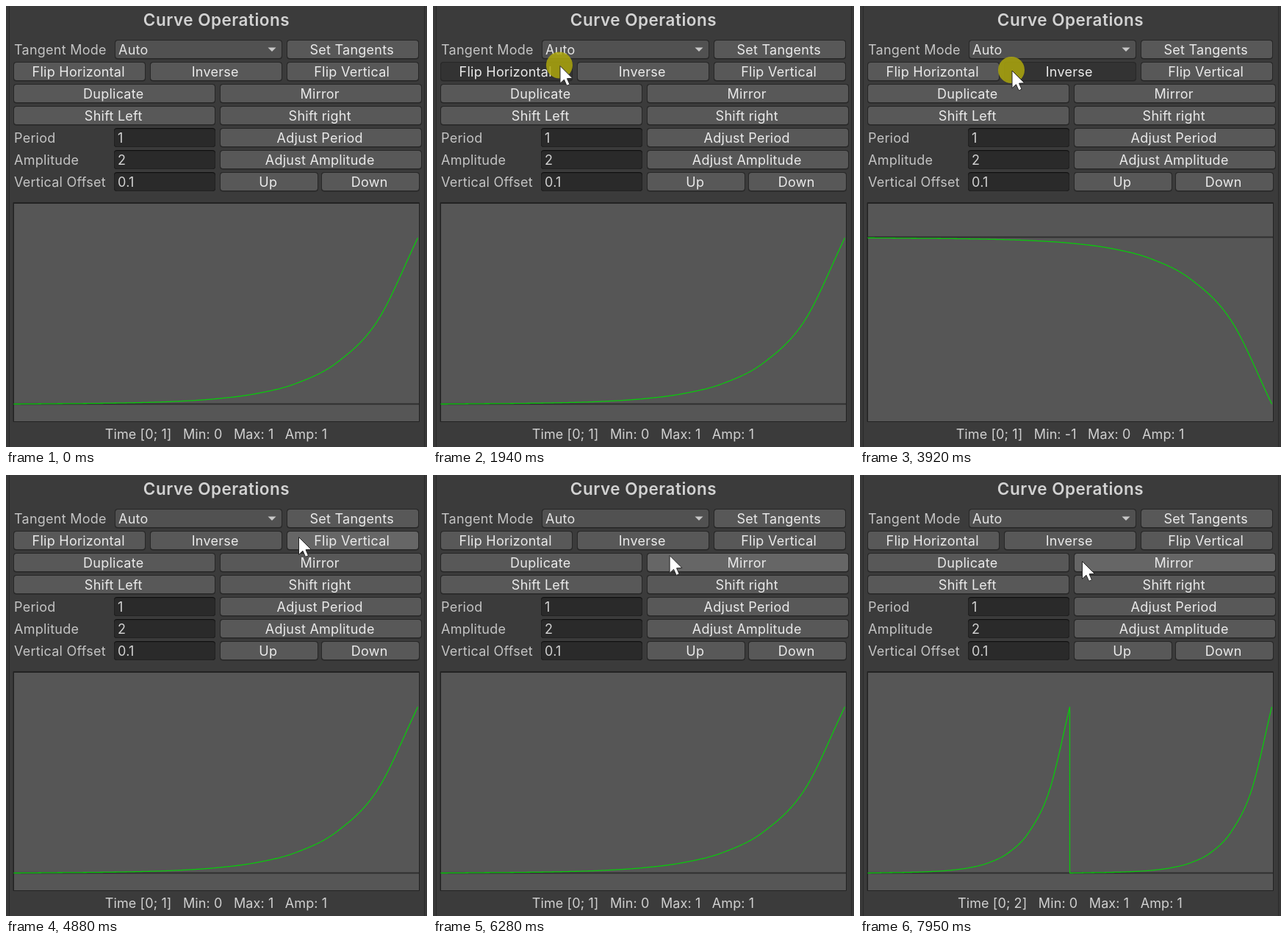
Animation of 573 by 600 pixels, one loop 8 s. Source, as an HTML page with a canvas:

```html
<!DOCTYPE html>
<html lang="en">
<head>
<meta charset="utf-8">
<title>Curve Operations</title>
<style>
html, body { margin: 0; width: 100%; height: 100%; overflow: hidden; background: #383838; }
canvas { display: block; width: 573px; height: 600px; }
</style>
</head>
<body>
<canvas id="stage"></canvas>
<script>
const W = 573, H = 600, LOOP = 8000;
const canvas = document.getElementById('stage');
const ctx = canvas.getContext('2d');
const dpr = window.devicePixelRatio || 1;
canvas.width = W * dpr;
canvas.height = H * dpr;

const ROW_TOP = 46, ROW_STEP = 30, ROW_H = 26.5, FIELD_H = 26;
const FONT = 'Inter, "Open Sans", sans-serif';
const BODY = { font: '18px', tracking: 0.25 };
const TITLE = { font: '600 22.5px', tracking: 0.5 };
const STATUS = { font: '18px', tracking: 0.1 };

// [label, row, left, right]
const buttons = [
  ['Set Tangents', 0, 382, 562],
  ['Flip Horizontal', 1, 10, 190], ['Inverse', 1, 196, 376], ['Flip Vertical', 1, 382, 562],
  ['Duplicate', 2, 10, 285], ['Mirror', 2, 291, 566],
  ['Shift Left', 3, 10, 285], ['Shift right', 3, 291, 566],
  ['Adjust Period', 4, 291, 566],
  ['Adjust Amplitude', 5, 291, 566],
  ['Up', 6, 291, 425], ['Down', 6, 429, 563]
];
const fields = [['Period', 4, '1'], ['Amplitude', 5, '2'], ['Vertical Offset', 6, '0.1']];

// [press, release, curve shown afterwards]
const clicks = [
  [1940, 2010, 'flipX'], [2350, 2420, 'plain'],
  [3450, 3520, 'inverse'], [3920, 3990, 'plain'],
  [5010, 5140, 'flipY'], [5740, 5870, 'plain'],
  [7020, 7090, 'double']
];

// Stepped pointer moves along quadratic paths
const smooth = u => u * u * (3 - 2 * u);
const easeOut = u => 1 - (1 - u) ** 2;
const linear = u => u;
const moves = [
  { t0: 720, t1: 1470, n: 12, from: [531, 351], via: [310, 135], to: [174, 82], ease: smooth, fresh: true },
  { t0: 1540, t1: 1540, n: 1, from: [174, 82], via: [173, 81], to: [172.5, 81], ease: linear },
  { t0: 2540, t1: 2750, n: 4, from: [172.5, 81], via: [200, 87], to: [205.5, 87], ease: smooth },
  { t0: 2980, t1: 2980, n: 1, from: [205.5, 87], via: [206, 87], to: [206.5, 87.5], ease: linear },
  { t0: 4190, t1: 4880, n: 11, from: [206.5, 87.5], via: [305, 99], to: [398, 84], ease: smooth },
  { t0: 6140, t1: 6760, n: 10, from: [398, 84], via: [318, 117], to: [258, 117], ease: easeOut },
  { t0: 7690, t1: 7950, n: 5, from: [258, 117], via: [280, 117], to: [302, 117], ease: smooth }
];

function pointer(t) {
  const m = moves.filter(m => t >= m.t0).pop();
  if (!m) return null;
  const gap = m.n > 1 ? (m.t1 - m.t0) / (m.n - 1) : 1;
  const step = Math.min(m.n - 1, Math.floor((t - m.t0) / gap + 1e-6));
  const u = m.ease(m.fresh ? step / (m.n - 1) : (step + 1) / m.n);
  return m.from.map((a, i) => (1 - u) ** 2 * a + 2 * u * (1 - u) * m.via[i] + u * u * m.to[i]);
}

// Exponential ease sampled at tenths, joined with auto tangents
const key = i => i <= 0 ? 0 : 2 ** (Math.min(i, 10) - 10);
const slope = i => i <= 0 ? 0 : i >= 10 ? key(10) - key(9) : (key(i + 1) - key(i - 1)) / 2;
function expo(t) {
  const i = Math.min(9, Math.floor(t * 10)), s = t * 10 - i;
  const s2 = s * s, s3 = s2 * s;
  return (2 * s3 - 3 * s2 + 1) * key(i) + (s3 - 2 * s2 + s) * slope(i) +
         (3 * s2 - 2 * s3) * key(i + 1) + (s3 - s2) * slope(i + 1);
}

const curves = {
  plain: expo,
  flipX: u => expo(1 - u),
  flipY: u => 1 - expo(u),
  inverse: u => 1 - expo(u),
  double: u => u <= 0.5 ? expo(u * 2) : expo(u * 2 - 1)
};

function rect(x, y, w, h, color, r = 0) {
  ctx.fillStyle = color;
  ctx.beginPath();
  ctx.roundRect(x, y, w, h, r);
  ctx.fill();
}

function text(str, x, y, color, align = 'left', style = BODY) {
  ctx.font = `${style.font} ${FONT}`;
  ctx.letterSpacing = `${style.tracking}px`;
  ctx.textAlign = align;
  ctx.fillStyle = color;
  ctx.fillText(str, x, y);
}

const rowY = row => ROW_TOP + row * ROW_STEP;
const baseY = row => rowY(row) + 19.5;

function box(row, x0, x1, face) {
  const y = rowY(row);
  rect(x0, y, x1 - x0, ROW_H, '#272727', 4);
  rect(x0 + 1, y + 1, x1 - x0 - 2, ROW_H - 2.5, face, 3.5);
}

function field(row, x0, x1) {
  const y = rowY(row), w = x1 - x0;
  rect(x0, y, w, FIELD_H, '#0f0f0f', 4);
  rect(x0, y + 1, w, FIELD_H - 1, '#212121', 4);
  rect(x0 + 1, y + 1.5, w - 2, FIELD_H - 2.5, '#2a2a2a', 3);
}

function drawControls(pos, pressed) {
  text('Curve Operations', 286.5, 27, '#d2d2d2', 'center', TITLE);
  text('Tangent Mode', 11, baseY(0), '#c4c4c4');
  box(0, 148, 376, '#515151');
  text('Auto', 153, baseY(0), '#e4e4e4');
  ctx.fillStyle = '#c8c8c8';
  ctx.beginPath();
  ctx.moveTo(356.5, 56.5);
  ctx.lineTo(367.5, 56.5);
  ctx.lineTo(362, 62);
  ctx.fill();

  for (const [label, row, x0, x1] of buttons) {
    const y = rowY(row);
    const over = pos && pos[0] >= x0 && pos[0] < x1 && pos[1] >= y && pos[1] < y + ROW_H;
    box(row, x0, x1, over ? (pressed ? '#333333' : '#666666') : '#585858');
    text(label, (x0 + x1) / 2 - 1.3, baseY(row), '#eaeaea', 'center');
  }
  for (const [label, row, value] of fields) {
    text(label, 11, baseY(row), '#c4c4c4');
    field(row, 147, 285);
    text(value, 152, baseY(row), '#d2d2d2');
  }
}

function drawGraph(mode) {
  const x0 = 10.5, x1 = 560.5, top = 315.5, bottom = 541.5;
  rect(9.5, 267, 553.5, 299, '#232323', 1);
  rect(11, 269, 551, 296, '#565656');
  rect(11, Math.floor(mode === 'inverse' ? top - 1 : bottom) - 0.5, 551, 2, '#303030');

  ctx.save();
  ctx.beginPath();
  ctx.rect(10, 268, 552, 297);
  ctx.clip();
  ctx.strokeStyle = '#0ac80c';
  ctx.lineWidth = 1.3;
  ctx.lineJoin = 'bevel';
  ctx.beginPath();
  const steps = x1 - x0;
  for (let i = 0; i <= steps; i++) {
    ctx.lineTo(x0 + i, bottom - curves[mode](i / steps) * (bottom - top));
    // The repeated curve drops straight back to its start value
    if (mode === 'double' && i === steps / 2) ctx.lineTo(x0 + i, bottom);
  }
  ctx.stroke();
  ctx.restore();

  const end = mode === 'double' ? 2 : 1;
  const [min, max] = mode === 'inverse' ? [-1, 0] : [0, 1];
  text(`Time [0; ${end}]   Min: ${min}   Max: ${max}   Amp: 1`, 286, 589, '#d0d0d0', 'center', STATUS);
}

function drawPointer([x, y], pressed) {
  if (pressed) {
    ctx.fillStyle = 'rgba(174, 169, 12, 0.84)';
    ctx.beginPath();
    ctx.arc(x - 0.5, y - 0.5, 18, 0, Math.PI * 2);
    ctx.fill();
  }
  const shape = [[0, 0], [0, 17], [3.9, 13.4], [6.5, 19.2], [9.3, 18], [6.8, 12.3], [12, 12]];
  ctx.beginPath();
  for (const [px, py] of shape) ctx.lineTo(x + 0.5 + px * 1.4, y + 0.5 + py * 1.4);
  ctx.closePath();
  ctx.fillStyle = '#ffffff';
  ctx.fill();
  ctx.strokeStyle = '#262626';
  ctx.lineWidth = 1;
  ctx.stroke();
}

function draw(t) {
  ctx.setTransform(dpr, 0, 0, dpr, 0, 0);
  rect(0, 0, W, H, '#383838');
  rect(4, 0, 566, H, '#2b2b2b');
  rect(5, 0, 564, H, '#3b3b3b');

  const pos = pointer(t);
  const pressed = clicks.some(([a, b]) => t >= a && t < b);
  const done = clicks.filter(c => t >= c[1]).pop();
  drawControls(pos, pressed);
  drawGraph(done ? done[2] : 'plain');
  if (pos) drawPointer(pos, pressed);
}

const start = performance.now();
function tick() {
  draw((performance.now() - start) % LOOP);
  requestAnimationFrame(tick);
}
tick();
</script>
</body>
</html>
```
